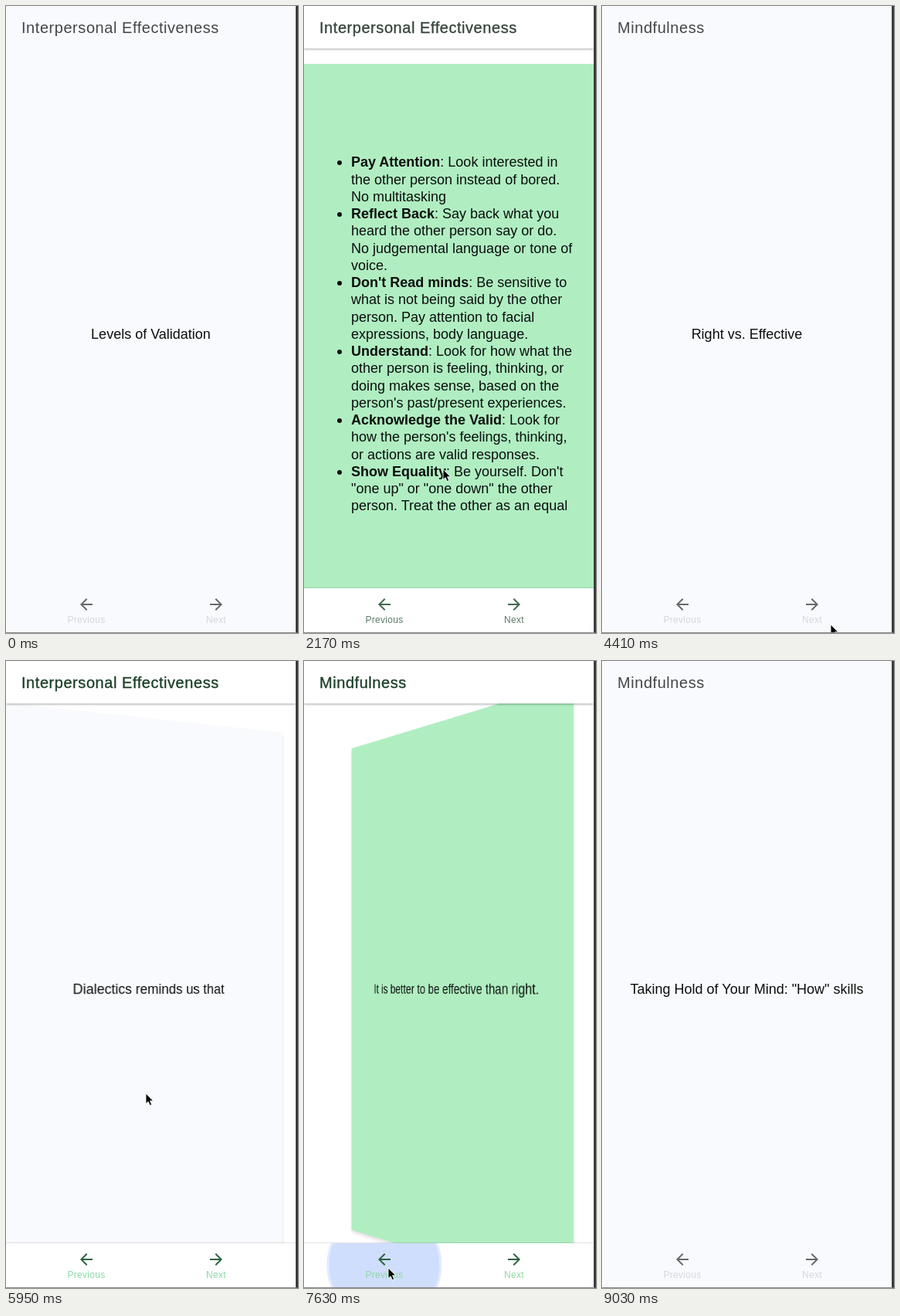
An HTML page that plays this animation: 378x812 px, repeating every 9.31 s.

```html
<!DOCTYPE html>
<html lang="en">
<head>
<meta charset="utf-8">
<title>Flash cards</title>
<style>
html, body { margin: 0; width: 100%; height: 100%; overflow: hidden; }
body { font: 18px/22.25px "Liberation Sans", Arial, sans-serif; color: #0b0f0d; }
#stage {
  position: relative; width: 378px; height: 812px; overflow: hidden; background: #fff;
  --title: #505252; --icon: #606262; --label: #686a6a;
}
#stage::after {
  content: ""; position: absolute; inset: 0; z-index: 3;
  border-right: 3px solid #3a3b3d; border-bottom: 1px solid #8a8c8e; box-sizing: border-box;
}
#stage.late { --title: #37463d; --icon: #41694f; --label: #5f7a68; }
#stage.green { --title: #1c4029; --icon: #2c6340; --label: #8cd8a5; }
#stage.calm { background: #f8fafd; --title: #444648; --icon: #68696b; --label: rgba(90, 92, 94, .22); }

header, nav { position: absolute; left: 0; width: 375px; z-index: 1; background: #fff; }
header {
  top: 0; height: 55px; box-shadow: 0 1px 3px rgba(0, 0, 0, .35);
  color: var(--title); font-size: 20px; line-height: 56px; letter-spacing: .55px;
  text-indent: 20px; -webkit-text-stroke: .35px;
}
nav { top: 754px; height: 58px; box-shadow: 0 -1px 1px rgba(0, 0, 0, .1); }
.calm header, .calm nav { background: #f8fafd; box-shadow: none; -webkit-text-stroke: 0; }
.action { position: absolute; top: 0; width: 168px; height: 58px; overflow: hidden; text-align: center; }
.action svg { position: absolute; left: 72px; top: 9px; width: 24px; height: 24px; fill: var(--icon); }
.action span {
  position: absolute; left: 0; right: 0; top: 33px; color: var(--label);
  font-size: 12px; line-height: 16px; letter-spacing: .28px;
}
.ripple {
  position: absolute; left: 84px; top: 28px; border-radius: 50%; transform: translate(-50%, -50%);
  background: #cfdefd; border: 3px solid #e2ebff; box-sizing: border-box;
}
.calm .ripple { display: none; }

#scene { position: absolute; left: 0; top: 75px; width: 375px; height: 700px; perspective: 1000px; }
.face {
  position: absolute; inset: 0; display: flex; align-items: center; justify-content: center;
  backface-visibility: hidden; white-space: pre; background: #f8fafd;
  box-shadow: 0 3px 5px rgba(0, 0, 0, .14);
}
.calm .face { box-shadow: none; }
#back { background: #b0eec2; }
.face ul, .face ol { position: absolute; left: 61px; margin: 0; padding: 0; list-style: none; }
.face li { position: relative; }
.face ul li::before {
  content: ""; position: absolute; left: -18px; top: 9px; width: 6px; height: 6px;
  border-radius: 50%; background: #0b0f0d;
}
.face ol { line-height: 22.9px; counter-reset: n; }
.face ol li { counter-increment: n; font-weight: bold; }
.face ol li::before { content: counter(n) "."; position: absolute; left: -20px; font-weight: normal; }
#cursor { position: absolute; left: 0; top: 0; width: 14px; height: 20px; z-index: 2; overflow: visible; }
</style>
</head>
<body>
<div id="stage">
  <div id="scene">
    <div class="face" id="front"></div>
    <div class="face" id="back"></div>
  </div>
  <header id="title"></header>
  <nav>
    <div class="action" style="left:20px">
      <div class="ripple" id="rippleBack"></div>
      <svg viewBox="0 0 24 24"><path d="M20 11H7.83l5.59-5.59L12 4l-8 8 8 8 1.41-1.41L7.83 13H20z"/></svg>
      <span>Previous</span>
    </div>
    <div class="action" style="left:188px">
      <div class="ripple" id="rippleNext"></div>
      <svg viewBox="0 0 24 24"><path d="M4 11h12.17l-5.59-5.59L12 4l8 8-8 8-1.41-1.41L16.17 13H4z"/></svg>
      <span>Next</span>
    </div>
  </nav>
  <svg id="cursor" viewBox="0 0 14 20">
    <path d="M0 0V13.5L3.1 10.7 5.3 15.6 7.7 14.6 5.6 9.8H9.8Z" fill="#000" stroke="#fff" stroke-width=".9"/>
  </svg>
</div>
<script>
const LOOP = 9310, FLIP = 500, RIPPLE = 550;
const $ = id => document.getElementById(id);
const list = (tag, items) => `<${tag}>${items.map(i => `<li>${i}</li>`).join("")}</${tag}>`;

const IE = "Interpersonal Effectiveness", MIND = "Mindfulness";
const cards = [
  { title: IE, front: "Levels of Validation", back: list("ul", [
    "<b>Pay Attention</b>: Look interested in\nthe other person instead of bored.\nNo multitasking",
    "<b>Reflect Back</b>: Say back what you\nheard the other person say or do.\nNo judgemental language or tone of\nvoice.",
    "<b>Don't Read minds</b>: Be sensitive to\nwhat is not being said by the other\nperson. Pay attention to facial\nexpressions, body language.",
    "<b>Understand</b>: Look for how what the\nother person is feeling, thinking, or\ndoing makes sense, based on the\nperson's past/present experiences.",
    "<b>Acknowledge the Valid</b>: Look for\nhow the person's feelings, thinking,\nor actions are valid responses.",
    "<b>Show Equality</b>: Be yourself. Don't\n\"one up\" or \"one down\" the other\nperson. Treat the other as an equal"
  ]) },
  { title: MIND, front: "Taking Hold of Your Mind: \"How\" skills",
    back: list("ul", ["Nonjudgmentally", "One-mindfully", "Effectively"]) },
  { title: MIND, front: "Right vs. Effective", back: "It is better to be effective than right." },
  { title: IE, front: "Dialectics reminds us that", back: list("ol", [
    "The universe is filled with\nopposing sides/opposing forces",
    "Everything and every person is\nconnected in some way",
    "Change is the only constant",
    "Change is transactional"
  ]) }
];

// [time, card index]
const steps = [[0, 0], [2430, 1], [3360, 2], [5100, 3], [7546, 2], [8480, 1]];
// [open time, close time]
const flips = [[1275, 2430], [5901, 7546]];
// [time, x, y]
const path = [
  [1050, 250, 830], [1230, 180, 600], [2190, 180, 600], [2380, 282, 785], [4060, 282, 785],
  [4410, 296, 801], [4620, 296, 801], [4830, 284, 786], [5250, 284, 786], [5700, 181, 560],
  [6850, 181, 560], [7260, 109, 786], [8650, 109, 786], [8960, 135, 830]
];

function bezier(x1, y1, x2, y2) {
  const at = (a, b, s) => 3 * (1 - s) * (1 - s) * s * a + 3 * (1 - s) * s * s * b + s * s * s;
  return x => {
    if (x <= 0) return 0;
    if (x >= 1) return 1;
    let lo = 0, hi = 1;
    for (let i = 0; i < 24; i++) {
      const mid = (lo + hi) / 2;
      if (at(x1, x2, mid) < x) lo = mid; else hi = mid;
    }
    return at(y1, y2, lo);
  };
}
const ease = bezier(.25, .1, .25, 1);
const standard = bezier(.4, 0, .2, 1);
const smooth = bezier(.42, 0, .58, 1);

function flipAt(t) {
  let p = 0;
  for (const [open, close] of flips) p += ease((t - open) / FLIP) - ease((t - close) / FLIP);
  return p;
}

function moveCursor(t) {
  const i = path.findIndex(k => k[0] > t);
  $("cursor").style.display = i > 0 ? "" : "none";
  if (i < 1) return;
  const [t0, x0, y0] = path[i - 1], [t1, x1, y1] = path[i];
  const k = smooth((t - t0) / (t1 - t0));
  $("cursor").style.transform = `translate(${x0 + (x1 - x0) * k}px, ${y0 + (y1 - y0) * k}px)`;
}

function drawRipple(id, t, start, release) {
  const size = t < start ? 0 : 177 * standard((t - start) / RIPPLE);
  const s = $(id).style;
  s.width = s.height = size + "px";
  s.opacity = size ? 1 - standard((t - release) / RIPPLE) : 0;
}

let shown = -1;
function showCard(i) {
  if (i === shown) return;
  shown = i;
  $("title").textContent = cards[i].title;
  $("front").textContent = cards[i].front;
  $("back").innerHTML = cards[i].back;
}

function mood(t, p) {
  if (p < 1e-6) return "calm";
  if (t > 5000) return "green";
  return t > 1780 ? "late" : "";
}

function draw(now) {
  const t = now % LOOP;
  const p = flipAt(t);
  showCard(steps.filter(s => s[0] <= t).pop()[1]);
  $("stage").className = mood(t, p);
  $("front").style.transform = `rotateY(${180 * p}deg)`;
  $("back").style.transform = `rotateY(${180 * p - 180}deg)`;
  drawRipple("rippleNext", t, 2370, 2500);
  drawRipple("rippleBack", t, 7322, 7640);
  moveCursor(t);
}

const start = performance.now();
function frame() {
  draw(performance.now() - start);
  requestAnimationFrame(frame);
}
frame();
</script>
</body>
</html>
```
